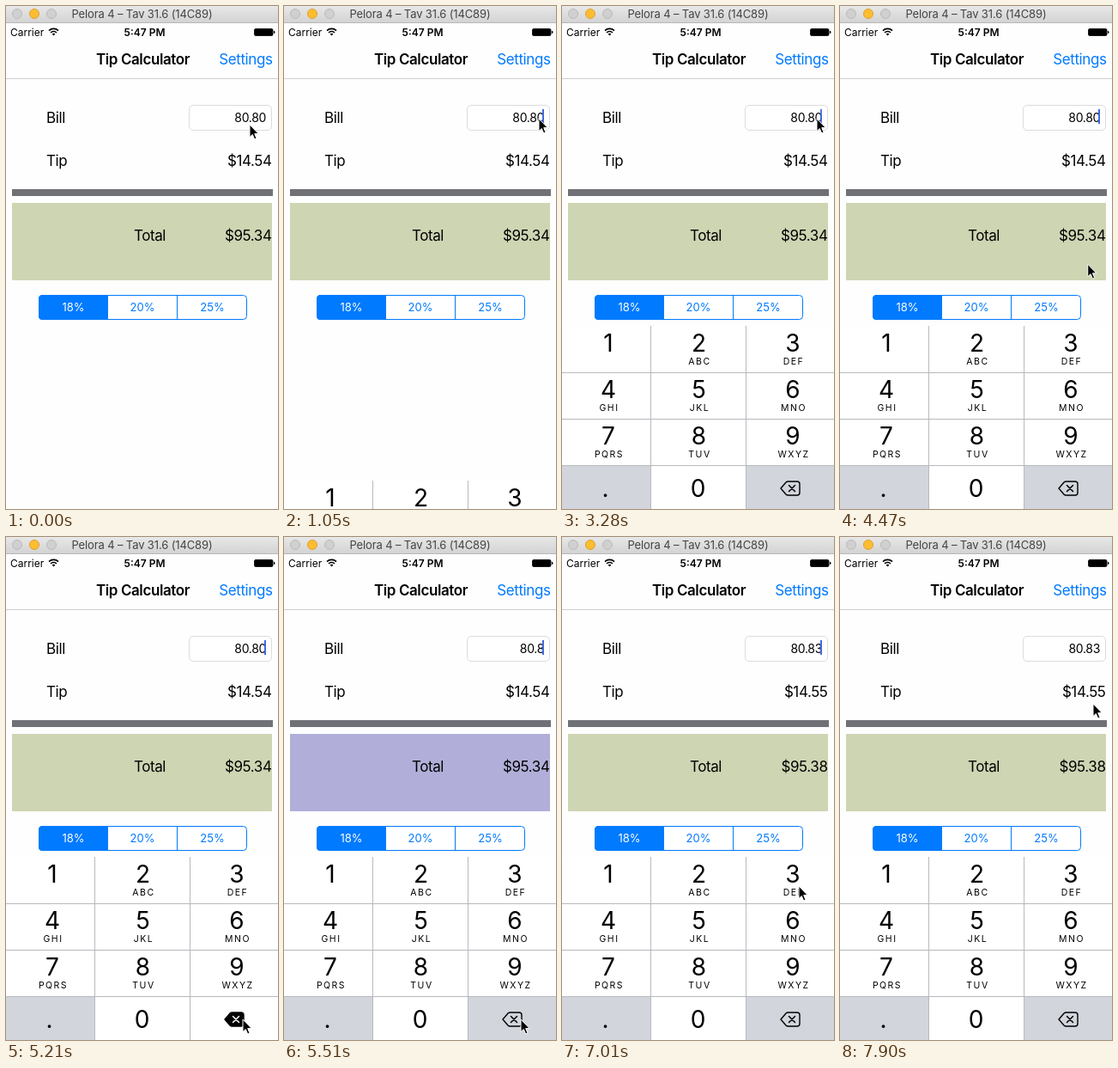
Animation of 317x585 px, one loop 8 s. Source, as an HTML page:

```html
<!DOCTYPE html>
<html lang="en">
<head>
<meta charset="utf-8">
<title>Tip Calculator</title>
<style>
  html, body { margin: 0; width: 100%; height: 100%; overflow: hidden; background: #fefefe; }
  svg { display: block; width: 317px; height: 585px; }
  text { font-family: Inter, Roboto, sans-serif; font-size: 17px; letter-spacing: -.024em; white-space: pre; }
  .mid { text-anchor: middle; }
  .end { text-anchor: end; }
  .status { font-size: 12px; letter-spacing: 0; }
  .bold { font-weight: 600; }
  .blue { fill: #007aff; }
  .small { font-size: 13px; letter-spacing: 0; }
  .digit { font-size: 28px; letter-spacing: 0; }
  .letters { font-size: 10.5px; letter-spacing: 1.5px; }
</style>
</head>
<body>
<svg viewBox="0 0 317 585">
  <defs>
    <linearGradient id="chrome" x2="0" y2="1">
      <stop stop-color="#e8e8e8"/><stop offset="1" stop-color="#d2d2d2"/>
    </linearGradient>
  </defs>
  <rect width="317" height="585" fill="#fefefe"/>

  <!-- window bar -->
  <rect width="317" height="20" fill="url(#chrome)"/>
  <path d="M0 19.5H317" stroke="#b8b8b8"/>
  <g fill="#d0d0d0" stroke="#bababa">
    <circle cx="13" cy="9" r="5.5"/>
    <circle cx="33" cy="9" r="5.5" fill="#fdbd30" stroke="#dfa032"/>
    <circle cx="53" cy="9" r="5.5"/>
  </g>
  <text class="mid" x="158.5" y="14" fill="#444" style="font-size:13px;letter-spacing:-.01em">Pelora 4 – Tav 31.6 (14C89)</text>

  <!-- status bar -->
  <text class="status" x="5" y="35">Carrier</text>
  <g fill="none" stroke="#000" stroke-width="1.6">
    <path d="M50 28.6A8 8 0 0 1 61 28.6M52 31A5 5 0 0 1 59 31"/>
    <path d="M53.6 32.6A2.8 2.8 0 0 1 57.4 32.6L55.5 34.6Z" fill="#000" stroke="none"/>
  </g>
  <text class="status bold mid" x="161.5" y="35">5:47 PM</text>
  <rect x="289.5" y="26.5" width="21.5" height="8" rx="1.5" stroke="#000" stroke-width=".8"/>
  <path d="M312 28.8q1.5 .3 1.5 1.7t-1.5 1.7z"/>

  <!-- navigation -->
  <text class="bold mid" x="159.5" y="68">Tip Calculator</text>
  <text class="blue end" x="310.5" y="68">Settings</text>
  <path d="M0 84.5H317" stroke="#cfcfcf"/>

  <!-- form -->
  <text x="47" y="136">Bill</text>
  <rect x="213.5" y="115.5" width="96" height="29" rx="4.5" fill="#fff" stroke="#dcdcdc"/>
  <text id="bill" class="end" x="303" y="135" style="font-size:14px"></text>
  <rect id="caret" x="301" y="120" width="2" height="17" fill="#4169e1"/>
  <text x="47" y="186">Tip</text>
  <text id="tip" class="end" x="309.5" y="186"></text>
  <rect x="7" y="213" width="304" height="8" fill="#6f7177"/>
  <rect x="7" y="229" width="303" height="90" fill="#ced5b3"/>
  <rect id="flash" x="7" y="229" width="303" height="90" fill="#b1afd9"/>
  <text class="end" x="186" y="273">Total</text>
  <text id="total" class="end" x="309.5" y="273"></text>

  <!-- tip rates -->
  <rect x="38.5" y="336.5" width="242" height="28" rx="4" fill="#fff" stroke="#007aff"/>
  <path class="blue" d="M119 336H42.5q-4.500 0-4.500 4.500v20q0 4.500 4.500 4.500H119z"/>
  <path d="M199.500 336V365" stroke="#007aff"/>
  <text class="small mid" x="78.500" y="355" fill="#fff">18%</text>
  <text class="small mid blue" x="159" y="355">20%</text>
  <text class="small mid blue" x="240.500" y="355">25%</text>

  <g id="keyboard">
    <rect y="372" width="317" height="213" fill="#fff"/>
    <rect y="534" width="103" height="51" fill="#d2d5db"/>
    <rect id="eraseKey" x="215" y="534" width="102" height="51"/>
    <rect id="threeKey" x="215" y="372" width="102" height="54" fill="#d2d5db"/>
    <path d="M0 426.5H317M0 480.5H317M0 534.5H317M103.500 372V585M214.500 372V585" stroke="#b7b9be"/>
    <g id="keys"></g>
    <path id="eraseIcon" d="M255 561l6-7q1-1 2.500-1H274q3 0 3 3v10q0 3-3 3H263.500q-1.500 0-2.500-1z" stroke="#000" stroke-width="1.400" stroke-linejoin="round"/>
    <path id="eraseCross" d="M264.500 557.500l7 7m0-7l-7 7" stroke-width="1.500" stroke-linecap="round"/>
  </g>

  <path id="pointer" d="M0 0V14.500L3.300 11.500L5.700 17L8 16L5.700 10.600H10.200Z" stroke="#fff" stroke-width="1" stroke-linejoin="round"/>
</svg>
<script>
const LOOP = 8000, TICK = 149;
const el = id => document.getElementById(id);
const set = (id, name, value) => el(id).setAttribute(name, value);

const columns = [54, 159.5, 269];
const letters = ["", "ABC", "DEF", "GHI", "JKL", "MNO", "PQRS", "TUV", "WXYZ"];
const label = (kind, x, y, text) => `<text class="${kind} mid" x="${x}" y="${y}">${text}</text>`;
el("keys").innerHTML = letters.map((word, i) => {
  const x = columns[i % 3], y = 402 + 54 * Math.floor(i / 3);
  return label("digit", x, y, i + 1) + label("letters", x + 1, y + 15, word);
}).join("") + label("digit", 158.5, 571, 0) + label("digit", 50.5, 571, ".");

// Tracks hold [tick, value] pairs, one tick per screen refresh.
const pointerX = [[3, 284], [6, 297], [27, 297], [34, 276], [48, 276], [53, 295]];
const pointerY = [[0, 138], [1, 135], [3, 135], [6, 131], [27, 131], [34, 561],
  [38, 561], [45, 406], [48, 406], [53, 194]];
const slide = [[6, 216], [7, 180], [8, 54], [9, 7], [10, 0]];
const flash = [[35, 0], [36, 1], [38, 1], [45, 0]];
const caret = [[6, 0], [7, 1], [11, 1], [12, .1], [13, 0], [15, 0], [17, 1], [18, 1], [20, 0],
  [21, 0], [22, .9], [23, 1], [25, 1], [26, 0], [27, 0], [29, 1], [30, 1], [32, 0], [33, 0],
  [35, 1], [39, 1], [41, 0], [42, 0], [44, 1], [48, 1], [50, 0]];

const smooth = u => u * u * (3 - 2 * u);
function at(track, n, ease = u => u) {
  const i = track.findIndex(([tick]) => tick > n);
  if (i === 0) return track[0][1];
  if (i < 0) return track[track.length - 1][1];
  const [t0, a] = track[i - 1], [t1, b] = track[i];
  return a + (b - a) * ease((n - t0) / (t1 - t0));
}

function draw(ms) {
  const n = Math.floor((ms % LOOP + 8) / TICK);
  const typed = n >= 47, erasing = n === 35 || n === 36;

  el("bill").textContent = n < 36 ? "80.80" : typed ? "80.83" : "80.8";
  el("tip").textContent = typed ? "$14.55" : "$14.54";
  el("total").textContent = typed ? "$95.38" : "$95.34";

  set("caret", "opacity", at(caret, n));
  set("flash", "opacity", at(flash, n));
  set("keyboard", "transform", `translate(0 ${at(slide, n)})`);
  set("eraseKey", "fill", erasing ? "#fff" : "#d2d5db");
  set("eraseIcon", "fill", erasing ? "#000" : "none");
  set("eraseCross", "stroke", erasing ? "#fff" : "#000");
  set("threeKey", "opacity", n === 46 ? 1 : 0);
  set("pointer", "transform", `translate(${at(pointerX, n, smooth)} ${at(pointerY, n, smooth)})`);
}

const start = performance.now();
(function frame() {
  draw(performance.now() - start);
  requestAnimationFrame(frame);
})();
</script>
</body>
</html>
```
